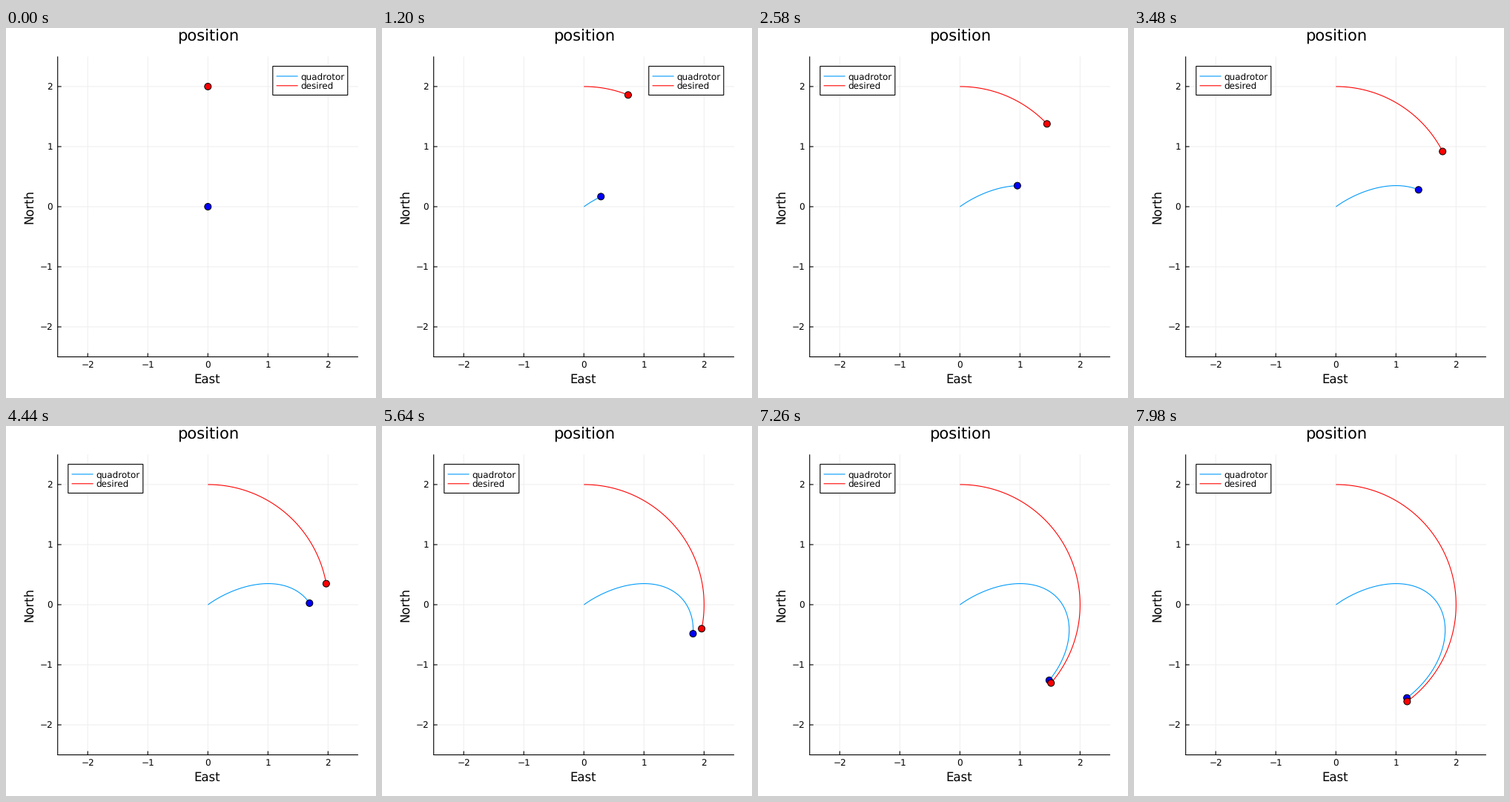
A matplotlib script for the animation above (8 s loop, 499 by 499 pixels).

```python
import numpy as np
import matplotlib.pyplot as plt
from matplotlib.animation import FuncAnimation
from matplotlib.patches import Circle, Rectangle

SIZE, DPI = 499, 100
PX = 72 / DPI                      # points per pixel
TICK_MS, STEP_MS, LOOP_MS = 20, 60, 8000
CX, CY, UNIT = 272.3, 241.0, 81.03
LEFT, RIGHT, TOP, BOTTOM = 69.7, 475, 38.4, 443.5
SWITCH_S = 2.16                    # the legend moves to the left corner
SKY = "#009afa"

plt.rcParams["font.family"] = "DejaVu Sans"
plt.rcParams["text.hinting"] = "none"
plt.rcParams["path.snap"] = False
fig = plt.figure(figsize=(SIZE / DPI, SIZE / DPI), dpi=DPI, facecolor="white")
ax = fig.add_axes([0, 0, 1, 1])
ax.set_xlim(0, SIZE)
ax.set_ylim(SIZE, 0)
ax.axis("off")


def line(xs, ys, color="black", width=1.1, z=2):
    return ax.plot(xs, ys, color=color, lw=width * PX, zorder=z,
                   solid_capstyle="butt")[0]


def text(x, y, s, size, ha="center", z=3, **kw):
    return ax.text(x, y, s, fontsize=size * PX, ha=ha, va="baseline", zorder=z, **kw)


def to_px(x, y):
    return CX + UNIT * x, CY - UNIT * y


def desired(t):
    a = 0.1 * np.pi * t
    return 2 * np.sin(a), 2 * np.cos(a)


def quadrotor(t):
    """Damped pursuit of the desired point, starting at rest in the centre."""
    a, b = 0.395, 0.387
    decay = np.exp(-a * t)
    dx = 0.2 * np.pi * decay * np.sin(b * t) / b
    dy = 2 * decay * (np.cos(b * t) + a / b * np.sin(b * t))
    sag = 0.027 * np.sin(0.28 * t)
    x, y = desired(t)
    return x - dx, y - dy - sag


# axes, grid and labels
for v in range(-2, 3):
    x, y = to_px(v, v)
    name = str(v).replace("-", "\u2212")
    line([x, x], [TOP, BOTTOM], "#eeeeee", 1, z=1)
    line([LEFT, RIGHT], [y, y], "#eeeeee", 1, z=1)
    line([x, x], [BOTTOM, BOTTOM - 5])
    line([LEFT, LEFT + 5], [y, y])
    text(x, 458.5, name, 12)
    text(63, y + 4.4, name, 12, ha="right")
line([LEFT, LEFT], [TOP, BOTTOM + 0.5])
line([LEFT, RIGHT], [BOTTOM, BOTTOM])
text(CX, 18, "position", 21)
text(CX - 0.8, 478.7, "East", 16.5)
text(37, CY - 0.5, "North", 16.5, rotation=90, rotation_mode="anchor")

# trails and markers
times = np.arange(0, LOOP_MS, STEP_MS) / 1000
tracks = []
for path, trail, fill, z in ((quadrotor, SKY, "blue", 6), (desired, "red", "red", 7)):
    xs, ys = to_px(*path(times))
    curve = line([], [], trail, z=z - 2)
    dot = Circle((xs[0], ys[0]), 4.5, fc=fill, ec="black", lw=PX, zorder=z)
    ax.add_patch(dot)
    tracks.append((xs, ys, curve, dot))


def legend(x):
    box = Rectangle((x, 51.6), 101, 38.9, fc="white", ec="black",
                    lw=1.1 * PX, zorder=8)
    ax.add_patch(box)
    parts = [box]
    for y, color, name in ((65, SKY, "quadrotor"), (77.8, "red", "desired")):
        parts.append(line([x + 4.8, x + 33.8], [y, y], color, z=9))
        parts.append(text(x + 37.4, y + 4.4, name, 12, ha="left", z=9))
    return parts


right_legend, left_legend = legend(359.8), legend(83.8)


def draw(k):
    n = k * TICK_MS // STEP_MS
    for xs, ys, curve, dot in tracks:
        curve.set_data(xs[:n + 1], ys[:n + 1])
        dot.center = xs[n], ys[n]
    moved = times[n] >= SWITCH_S - 1e-9
    for part in right_legend:
        part.set_visible(not moved)
    for part in left_legend:
        part.set_visible(moved)
    return []


anim = FuncAnimation(fig, draw, frames=LOOP_MS // TICK_MS, interval=TICK_MS,
                     repeat=True, repeat_delay=0, cache_frame_data=False)
plt.show()
```
